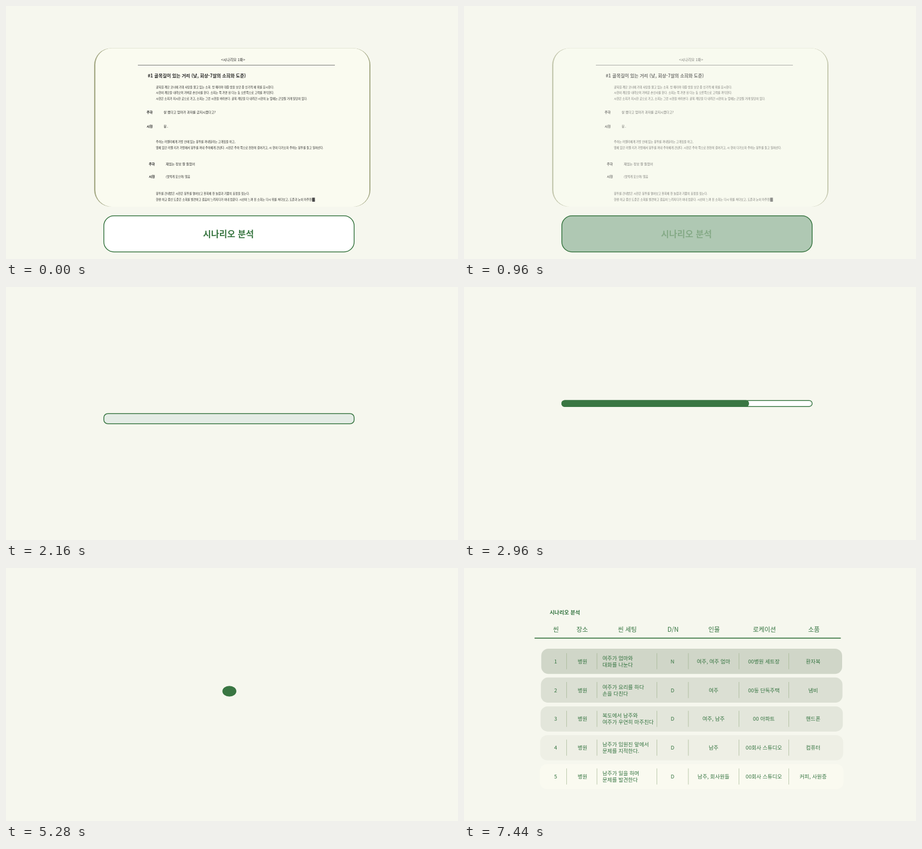
Animation, 826 px wide and 464 px high, one loop 7.52 s. Source, as an HTML page:

```html
<!DOCTYPE html>
<html lang="ko">
<head>
<meta charset="utf-8">
<style>
  html, body { margin: 0; width: 100%; height: 100%; overflow: hidden; background: #f6f7ee; }
  svg { display: block; width: 826px; height: 464px; }
  text { font-family: "Noto Sans CJK KR", "Noto Sans CJK", "Noto Sans CJK JP", sans-serif; white-space: pre; }
  #script text { fill: #222; }
  #header text, #rows text { fill: #33733f; }
  #shape { stroke: #397642; stroke-width: 1.5px; }
  #progress { fill: #397642; }
</style>
</head>
<body>
<svg viewBox="0 0 826 464">
  <g id="stack">
    <rect id="back" x="161" y="77.5" width="505" height="290.5" rx="31" fill="#a5a985"/>
    <rect id="middle" x="163.5" y="77.5" width="500.5" height="290.5" rx="30" fill="#d2d4c2"/>
    <rect x="163.5" y="77.5" width="500.5" height="290.5" rx="30" fill="#fafbf0"/>
    <g id="script">
      <path d="M241 108.5H601" stroke="#777" stroke-width="1"/>
      <rect x="559.5" y="351.5" width="5" height="7.5" fill="#555"/>
    </g>
  </g>
  <rect id="shape"/>
  <rect id="progress" x="178" y="207.5" height="12.5" rx="6"/>
  <g id="label"></g>
  <g id="header"></g>
  <g id="rows"></g>
</svg>
<script>
const LOOP = 7520, GREEN = '#397642';
const $ = id => document.getElementById(id);

function add(parent, tag, attrs) {
  const el = document.createElementNS('http://www.w3.org/2000/svg', tag);
  for (const key in attrs) el.setAttribute(key, attrs[key]);
  return parent.appendChild(el);
}

// Places text by its vertical centre.
function write(parent, content, x, centre, size, weight = 500, anchor = 'middle') {
  const el = add(parent, 'text', {
    x, y: centre + size * 0.36, 'font-size': size, 'font-weight': weight, 'text-anchor': anchor
  });
  el.textContent = content;
  return el;
}

// Keyframes are [time in ms, properties, easing towards the next one].
function animate(el, steps) {
  const frames = steps.map(([ms, props, easing = 'linear']) => ({ ...props, easing, offset: ms / LOOP }));
  if (frames[0].offset > 0) frames.unshift({ ...steps[0][1], offset: 0 });
  frames.push({ ...steps[steps.length - 1][1], offset: 1 });
  el.animate(frames, { duration: LOOP, iterations: Infinity });
}

const fade = (el, start, end, from, to) =>
  animate(el, [[start, { opacity: from }], [end, { opacity: to }]]);

// Script page
const script = $('script');
write(script, '<시나리오 1화>', 415, 99, 6.7);
write(script, '#1 골목길이 있는 거리 (낮, 회상-7살의 소희와 도준)', 259, 128, 8.25, 700, 'start');
[
  [149, '골목길 계단 코너에 기대 사탕을 물고 있는 소희. 멍 때리며 대중 땅을 보던 중 인기척 에 위를 응시한다.'],
  [159.5, '시현이 계단을 내려오며 가벼운 손인사를 한다. 소희는 쪽 가면 된 다는 듯 오른쪽으로 고객를 까닥한다.'],
  [170.5, '시현은 소희가 지시한 곳으로 가고, 소희는 그런 시현을 바라본다. 골목 계단을 다 내려간 시현의 눈 앞에는 군것질 거래 일당이 있다.'],
  [249.5, '주하는 러앨리에게 가방 안에 있는 봉투를 꺼내달라는 고개짓을 하고,'],
  [260.5, '옆에 있던 러엘 리가 가방에서 봉투를 꺼내 주하에게 건낸다. 시현은 주하 쪽으로 천천히 걸어가고, 시 현이 다가오자 주하는 봉투를 들고 일어선다.'],
  [344.5, '봉투를 건네받은 시현은 봉투를 열어보고 환희에 찬 놀람과 기쁨의 표정을 짓는다.'],
  [355, '한편 하교 중인 도준은 소희를 발견하고 걸음이 느려지다가 이내 멈춘다. 시선이 느껴 진 소희는 다시 위를 쳐다보고, 도준과 눈이 마주친다.']
].forEach(([y, line]) => write(script, line, 274, y, 5.13, 500, 'start'));
[
  [257, 195, '주하', 288, '살 쨌다고 엄마가 과자를 금지시켰다고?', 5.85],
  [257, 220.5, '시현', 288, '뭉..', 5.85],
  [261, 289.5, '주하', 292, '재밌는 정보 잘 들었어', 5.85],
  [261, 313, '시현', 292, '(멋쩍게 웃으며) 얼음', 5.2]
].forEach(([nameX, y, name, x, line, size]) => {
  write(script, name, nameX, y, 6, 700, 'start');
  write(script, line, x, y, size, 500, 'start');
});

// Cards fan out, close, and leave
for (const [id, lift] of [['back', 36.5], ['middle', 19]]) {
  const rest = { transform: 'translateY(0px)' };
  animate($(id), [
    [0, rest, 'ease-in-out'],
    [480, { transform: `translateY(${-lift}px)` }, 'ease-in-out'],
    [800, rest]
  ]);
}
fade($('stack'), 800, 1200, 1, 0);

// One shape: button, bar, ball, rule
const box = (x, y, width, height, rx, fill) => ({
  x: x + 'px', y: y + 'px', width: width + 'px', height: height + 'px', rx: rx + 'px', fill
});
const ball = (y, width, height) =>
  box(408.2 - width / 2, y - height / 2, width, height, 22, GREEN);
const bar = fill => box(178.75, 208.2, 457.5, 11, 5.5, fill);
const button = fill => box(178.75, 384.75, 457.5, 66.2, 18.5, fill);

animate($('shape'), [
  [800, button('#ffffff')],
  [1200, button(GREEN)],
  [1700, button(GREEN), 'ease-in-out'],
  [2320, bar('#ffffff')],
  [3200, bar('#ffffff')],
  [3201, bar(GREEN)],
  [3440, bar(GREEN), 'ease-in-out'],
  [3760, ball(213.7, 11.5, 11.5)],
  [3920, ball(213.7, 11.5, 11.5), 'ease-in'],
  [4240, ball(249, 24.5, 23)],
  [4340, ball(266.5, 41, 17), 'ease-out'],
  [4500, ball(210, 23, 26), 'ease-in-out'],
  [4640, ball(216.5, 26, 19.5)],
  [4720, ball(216.5, 26, 19.5), 'ease-in-out'],
  [5040, ball(216.5, 19, 19)],
  [5120, ball(216.5, 19, 19), 'ease-in-out'],
  [5280, ball(226, 24, 18), 'ease-in-out'],
  [5520, ball(128.6, 14, 8), 'ease-in-out'],
  [5840, box(129.5, 128.5, 558.5, 0.2, 0.1, GREEN)]
]);

const progress = $('progress');
animate(progress, [
  [2580, { width: '0px' }],
  [3090, { width: '459px' }],
  [3300, { width: '459px' }],
  [3301, { width: '0px' }]
]);

// Button label
const label = write($('label'), '시나리오 분석', 406.5, 418.5, 16, 700);
animate(label, [
  [800, { fill: GREEN, fontWeight: 700 }],
  [1200, { fill: '#f6f7ee', fontWeight: 500 }]
]);
animate($('label'), [
  [1600, { opacity: 1 }],
  [1920, { opacity: 0 }]
]);

// Table header
const header = $('header');
write(header, '시나리오 분석', 156.5, 82, 9.6, 700, 'start');
[['씬', 168], ['장소', 216], ['씬 세팅', 298.5], ['D/N', 382], ['인물', 457], ['로케이션', 549], ['소품', 639.5]]
  .forEach(([name, x]) => write(header, name, x, 113.3, 11.4));
fade(header, 5760, 6180, 0, 1);

// Table rows
const columns = [167.5, 216.5, 253, 381, 456, 548, 638];
const dividers = [187.5, 243, 352.5, 410, 502.5, 593.5];
const shades = ['#d0d6c8', '#dbdfd3', '#e3e6db', '#eeefe5', '#fafaf0'];
[
  '1|병원|여주가 엄마와/대화를 나눈다|N|여주, 여주 엄마|00병원 세트장|환자복',
  '2|병원|여주가 요리를 하다/손을 다친다|D|여주|00동 단독주택|냄비',
  '3|병원|복도에서 남주와/여주가 우연히 마주친다|D|여주, 남주|00 아파트|핸드폰',
  '4|병원|남주가 임원진 앞에서/문제를 지적한다.|D|남주|00회사 스튜디오|컴퓨터',
  '5|병원|남주가 일을 하며/문제를 발견한다|D|남주, 회사원들|00회사 스튜디오|커피, 사원증'
].forEach((row, i) => {
  const group = add($('rows'), 'g', {});
  const centre = 171.2 + i * 52.85;
  const left = 141.2 - i * 0.65;
  add(group, 'rect', {
    x: left, y: centre - 23.2, width: 2 * (416.1 - left), height: 46.2, rx: 13, fill: shades[i]
  });
  dividers.forEach(x => add(group, 'path', {
    d: `M${x} ${centre - 15}v29.5`, stroke: '#9fb38f', 'stroke-width': 0.7
  }));
  row.split('|').forEach((cell, c) => {
    const lines = cell.split('/');
    lines.forEach((line, n) => write(
      group, line, columns[c], centre + (lines.length > 1 ? n * 12 - 6 : 0), 9.6, 500,
      c === 2 ? 'start' : 'middle'
    ));
  });
  fade(group, 6400 + i * 180, 6720 + i * 180, 0, 1);
});
</script>
</body>
</html>
```
